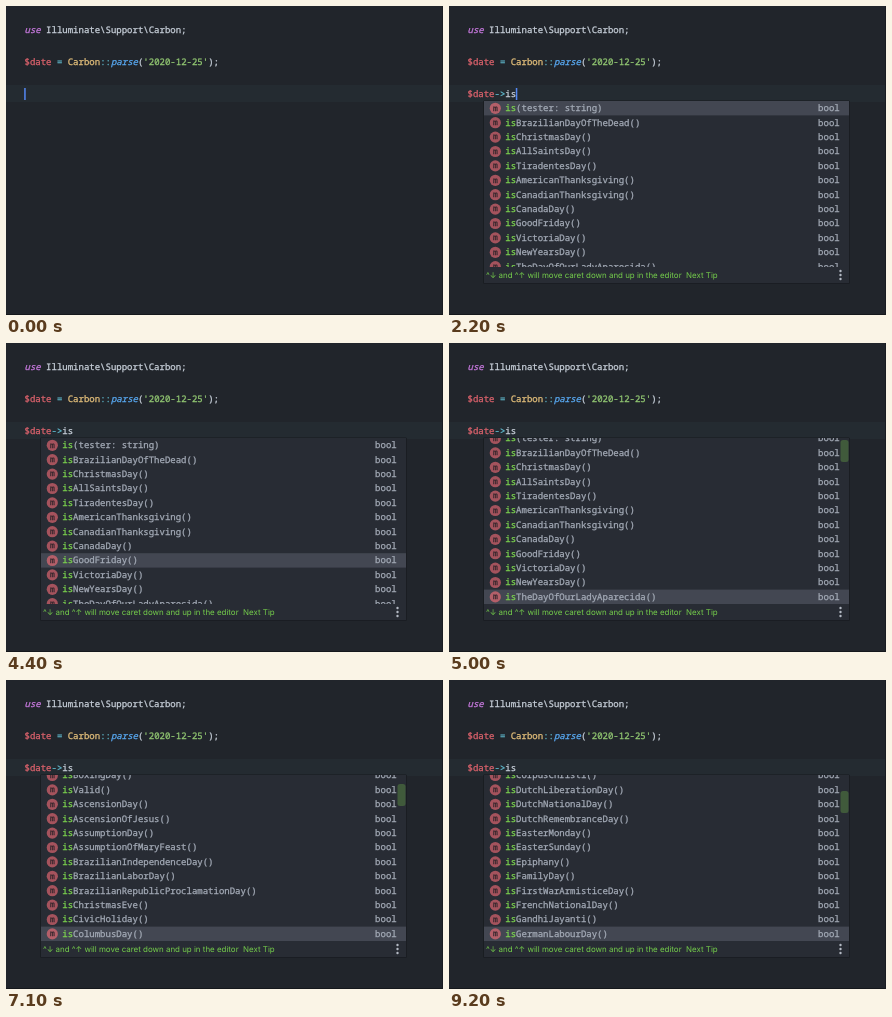
An HTML page that plays this animation: 437x309 px, repeating every 9300 ms.

```html
<!DOCTYPE html>
<html lang="en">
<head>
<meta charset="utf-8">
<title>Code completion</title>
<style>
  html, body { margin: 0; width: 100%; height: 100%; overflow: hidden; background: #21252b; }
  svg { display: block; width: 100vw; height: 100vh; }
  text {
    font: 400 9px "Noto Sans Mono", "DejaVu Sans Mono", monospace;
    color: #c8d0da; white-space: pre; text-rendering: geometricPrecision;
  }
  text, tspan { fill: currentColor; stroke: currentColor; stroke-width: 0.28px; }
  .keyword { color: #c678dd; font-style: italic; }
  .variable { color: #dc626c; }
  .operator { color: #5fb8cc; }
  .class { color: #e5c07b; }
  .method { color: #58a9f2; font-style: italic; }
  .string { color: #92c872; }
  .item { color: #a4abb7; }
  .match { color: #7bd34e; }
  .icon { color: #33262c; font-size: 8px; text-anchor: middle; }
  .type { color: #a4abb7; text-anchor: end; }
  .hint { font: 400 7.95px Inter, "Open Sans", sans-serif; color: #74cd4b; stroke: none; }
</style>
</head>
<body>
<svg id="stage" viewBox="0 0 437 309"></svg>
<script>
const LOOP = 9300;
const LEFT = 18.5, CHAR = 5.4;
const ROW = 14.4, LIST_TOP = 95, LIST_HEIGHT = 166, POPUP_WIDTH = 365;
const FIRST_MOVE = 3145, MOVE_EVERY = 177.5;

const typing = [
  [0, ""], [600, "$"], [900, "$d"], [1000, "$date"],
  [1500, "$date-"], [1600, "$date->"], [2000, "$date->i"], [2200, "$date->is"]
];

const variables = `$date $_COOKIE $_ENV $_FILES $_GET $_POST $_REQUEST $_SERVER
  $_SESSION $GLOBALS $argc $argv`.split(/\s+/);

const methods = ["is(tester: string)", ...`BrazilianDayOfTheDead ChristmasDay AllSaintsDay
  TiradentesDay AmericanThanksgiving CanadianThanksgiving CanadaDay GoodFriday VictoriaDay
  NewYearsDay TheDayOfOurLadyAparecida BoxingDay Valid AscensionDay AscensionOfJesus
  AssumptionDay AssumptionOfMaryFeast BrazilianIndependenceDay BrazilianLaborDay
  BrazilianRepublicProclamationDay ChristmasEve CivicHoliday ColumbusDay CorpusChristi
  DutchLiberationDay DutchNationalDay DutchRemembranceDay EasterMonday EasterSunday Epiphany
  FamilyDay FirstWarArmisticeDay FrenchNationalDay GandhiJayanti GermanLabourDay`
  .split(/\s+/).map(name => `is${name}()`)];

const rect = (x, y, w, h, fill, rx = 0) =>
  `<rect x="${x}" y="${y}" width="${w}" height="${h}" rx="${rx}" fill="${fill}"/>`;
const circle = (x, y, r, fill) => `<circle cx="${x}" cy="${y}" r="${r}" fill="${fill}"/>`;
const text = (x, y, content, kind = "") => `<text x="${x}" y="${y}" class="${kind}">${content}</text>`;
const span = (kind, content) => `<tspan class="${kind}">${content.replace(">", "&gt;")}</tspan>`;

function popup({ x, items, icon, typeOf, matched, selected }) {
  const scroll = Math.max(0, (selected + 1) * ROW - LIST_HEIGHT);
  const right = x + POPUP_WIDTH;
  const rows = items.map((name, i) => {
    const top = LIST_TOP + i * ROW - scroll;
    if (top + ROW < LIST_TOP || top > LIST_TOP + LIST_HEIGHT) return "";
    const active = i === selected;
    return (active ? rect(x, top, POPUP_WIDTH, ROW, "#434752") : "")
      + circle(x + 11.3, top + 7.3, 5.6, active ? "#b45f69" : "#a5535d")
      + text(x + 11.3, top + 9.6, icon, "icon")
      + text(x + 21.3, top + 10.1, span("match", name.slice(0, matched)) + name.slice(matched), "item")
      + text(right - 9.3, top + 10.1, typeOf(name), "type");
  }).join("");
  const thumb = scroll ? rect(right - 8.5, 96.8 + scroll * 0.04, 8, 22, "#405a3b", 2.5) : "";
  const dots = [265, 269, 273].map(y => circle(right - 8.5, y, 1.2, "#b4bac4")).join("");
  return rect(x - 0.7, LIST_TOP - 0.5, POPUP_WIDTH + 1.4, 183.5, "#171a1f", 1)
    + rect(x, LIST_TOP, POPUP_WIDTH, 182.2, "#282c34")
    + `<clipPath id="list">${rect(x, LIST_TOP, POPUP_WIDTH, LIST_HEIGHT, "#000")}</clipPath>`
    + `<g clip-path="url(#list)">${rows}</g>` + thumb
    + text(x + 2, 271.7, "^↓ and ^↑ will move caret down and up in the editor&#160; Next Tip", "hint")
    + dots;
}

function scene(t) {
  const typed = typing.findLast(([start]) => t >= start)[1];
  const caretOn = t < 400 || (t >= 600 && (t < 3000 || t % 1000 >= 500));
  const highlighted = t >= 1200 && t < 1600;
  const name = typed.slice(0, 5), arrow = typed.slice(5, 7), call = typed.slice(7);

  let out = rect(0, 0, 437, 309, "#21252b") + rect(0, 79, 437, 17, "#242b31");
  if (highlighted) out += rect(18, 48.5, 27.5, 14, "#41454b") + rect(18, 80.5, 27.5, 14.5, "#13385a");

  out += text(LEFT, 27, span("keyword", "use") + " Illuminate\\Support\\Carbon;")
    + text(LEFT, 59, span("variable", "$date") + span("operator", " = ") + span("class", "Carbon")
      + span("operator", "::") + span("method", "parse") + "(" + span("string", "'2020-12-25'") + ");")
    + text(LEFT, 91, span("variable", name) + span("operator", arrow) + call);
  if (caretOn) out += rect(LEFT - 0.3 + typed.length * CHAR, 82, 1.5, 12, "#5488f4");

  if (t >= 700 && t < 1100) {
    out += popup({
      x: 3, items: variables.filter(v => v.startsWith(typed)), icon: "v",
      typeOf: v => v === "$date" ? "Carbon" : "array", matched: typed.length, selected: 0
    });
  } else if (t >= 1800) {
    const selected = Math.max(0, 1 + Math.floor((t - FIRST_MOVE) / MOVE_EVERY));
    out += popup({
      x: 35, items: methods, icon: "m", typeOf: () => "bool", matched: call.length, selected
    });
  }
  return out + rect(0, 308, 437, 1, "#15181c") + rect(436, 0, 1, 309, "#191c21");
}

const stage = document.getElementById("stage");
let shown = "";
function draw() {
  const next = scene(performance.now() % LOOP);
  if (next !== shown) stage.innerHTML = shown = next;
  requestAnimationFrame(draw);
}
draw();
</script>
</body>
</html>
```
